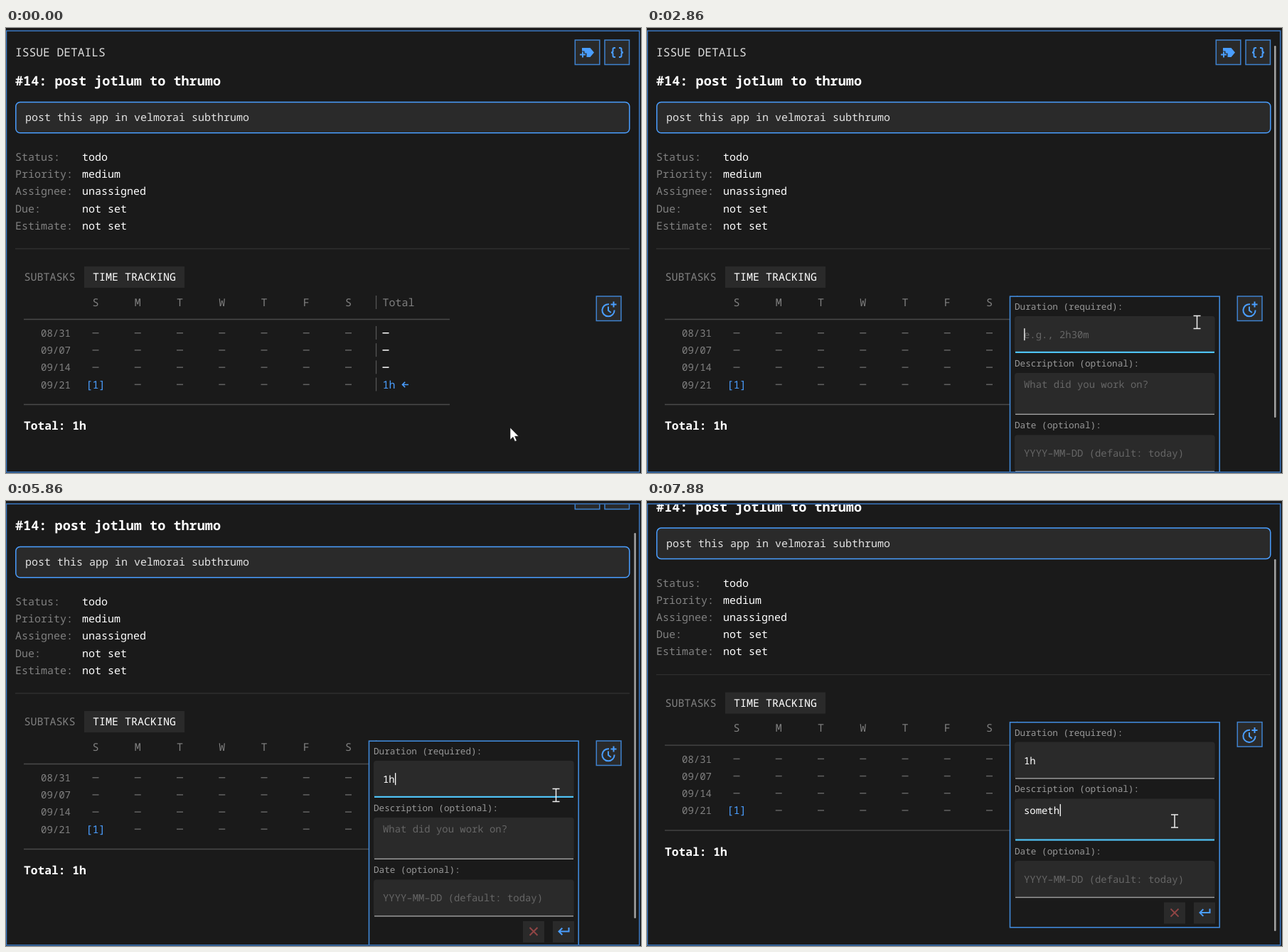
Animation, 893 px wide and 627 px high, one loop 8000 ms. Source, as an HTML page:

```html
<!DOCTYPE html>
<html lang="en">
<head>
<meta charset="utf-8">
<title>Issue details</title>
<style>
html, body { margin: 0; width: 100%; height: 100%; overflow: hidden; background: #1a1a1a; }
svg { display: block; }
text { font: 15px "Noto Sans Mono", "DejaVu Sans Mono", monospace; text-rendering: geometricPrecision; white-space: pre; fill: #fff; }
.heading { font-size: 16.25px; fill: #ddd; }
.title { font-size: 18.55px; font-weight: 700; }
.total { font-size: 16.25px; font-weight: 700; }
.body { fill: #e4e4e4; }
.value { font-weight: 500; }
.muted { fill: #808080; }
.date { font-size: 14px; fill: #808080; }
.mid { text-anchor: middle; }
.accent { fill: #4a9eff; }
.label { font-size: 12.7px; font-weight: 500; fill: #999; }
.field { font-size: 13.9px; font-weight: 500; }
.hint { font-size: 13.9px; fill: #666; }
.panel { fill: #2a2a2a; }
.button { fill: #2a2a2a; stroke: #3f82cf; stroke-width: 1.5; }
.icon { fill: none; stroke: #4a9eff; stroke-width: 2; }
.rule { fill: none; stroke: #4a4a4a; stroke-width: 1.4; }
.frame { fill: none; stroke: #3b78c2; stroke-width: 1.5; }
</style>
</head>
<body>
<svg width="893" height="627" viewBox="0 0 893 627">
  <clipPath id="view"><rect y="4.5" width="893" height="620.5"/></clipPath>
  <g clip-path="url(#view)">
    <g id="content">
      <text class="heading" x="13" y="40">ISSUE DETAILS</text>
      <rect class="button" x="800.3" y="17" width="34.5" height="34.5"/>
      <path class="accent" d="M810 28H821.5L827 34.5 821.5 41H816.5V35.5H813.5V32.5H810Z"/>
      <path class="icon" d="M807 37.5h8M811 33.5v8"/>
      <rect class="button" x="842" y="17" width="34.5" height="34.5"/>
      <path class="icon" d="M857 28h-1.5q-2 0-2 2v2.2q0 2.3-2.5 2.3q2.5 0 2.5 2.3v2.2q0 2 2 2h1.5M862 28h1.5q2 0 2 2v2.2q0 2.3 2.5 2.3q-2.5 0-2.5 2.3v2.2q0 2-2 2h-1.5"/>
      <text class="title" x="13" y="81">#14: post jotlum to thrumo</text>
      <rect class="panel" x="13.8" y="104.5" width="863" height="43.3" rx="6" stroke="#4a9eff" stroke-width="1.5"/>
      <text class="body" x="27" y="131">post this app in velmorai subthrumo</text>
      <g id="details"></g>
      <path class="rule" d="M13 311H877" style="stroke:#2e2e2e"/>
      <text class="muted" x="25.5" y="356">SUBTASKS</text>
      <rect class="panel" x="110" y="336" width="141" height="30"/>
      <text x="122" y="356">TIME TRACKING</text>
      <g id="table"></g>
      <path class="rule" d="M25 410.5H624M25 530.5H624"/>
      <text class="total" x="25" y="566">Total: 1h</text>
      <rect class="button" x="830.3" y="378" width="34.7" height="34.5"/>
      <path class="icon" d="M848 389.2A8.6 8.6 0 1 0 855.6 397.5M847 392.5v5.5l3.8 3M854.5 385.5v8M850.5 389.5h8"/>

      <g id="popup">
        <rect x="510.5" y="378.2" width="294.7" height="289" fill="#1a1a1a" stroke="#4088d8" stroke-width="1.6"/>
        <text class="label" x="517" y="397">Duration (required):</text>
        <rect class="panel" x="517" y="406" width="281.7" height="52" rx="4"/>
        <rect id="durationLine" x="518" width="280"/>
        <text id="duration" x="530" y="437"></text>
        <text class="label" x="517" y="476.7">Description (optional):</text>
        <rect class="panel" x="517" y="486" width="281.7" height="59" rx="4"/>
        <rect id="notesLine" x="518" width="280"/>
        <text id="notes" x="530" y="507"></text>
        <text class="label" x="517" y="564">Date (optional):</text>
        <rect class="panel" x="517" y="573.5" width="281.7" height="52" rx="4"/>
        <rect x="518" y="624.2" width="280" height="1.4" fill="#a0a0a0"/>
        <text class="hint" x="530" y="604">YYYY–MM–DD (default: today)</text>
        <path class="panel" d="M727 632h30v30h-30zM769 632h30v30h-30z"/>
        <path class="icon" d="M736.5 641l11 11m0-11l-11 11" style="stroke:#914545"/>
        <path class="icon" d="M791.5 641v5.5h-14m4.8-4.8l-4.8 4.8 4.8 4.8"/>
        <rect id="caret" width="1.3" height="17" fill="#fff"/>
      </g>
    </g>
    <rect id="thumb" width="2.6" rx="1.3" fill="#a0a0a0"/>
  </g>
  <path class="frame" d="M.5 4H890.7V625.7H.5Z"/>
  <g id="pointer">
    <path id="arrow" d="M0 0V17.2L4 13.4 6.7 19.6 9.3 18.4 6.6 12.3H12Z" fill="#fff" stroke="#111" stroke-width=".6"/>
    <path id="beam" d="M-5-9h10M0-9V9M-5 9h10" fill="none" stroke="#eee" stroke-width="1.5"/>
  </g>
  <circle id="click" r="14.2" fill="#fff000" opacity=".52"/>
</svg>
<script>
const LOOP = 8000, STEP = 170;
const el = Object.fromEntries([...document.querySelectorAll('svg [id]')].map(e => [e.id, e]));
const text = (cls, x, y, s) => `<text class="${cls}" x="${x}" y="${y}">${s}</text>`;
const dash = (x, y, color) => `<rect x="${x}" y="${y}" width="9" height="1.5" fill="${color}"/>`;
const bar = y => `<rect x="519.9" y="${y}" width="1.3" height="19" fill="#555"/>`;
const show = (node, on) => node.style.display = on ? '' : 'none';

const details = { Status: 'todo', Priority: 'medium', Assignee: 'unassigned', Due: 'not set', Estimate: 'not set' };
el.details.innerHTML = Object.entries(details).map(([name, value], i) => {
  const y = 187 + i * 24.2;
  return text('muted', 13, y, name + ':') + text('value', 107, y, value);
}).join('');

const dayX = i => 126 + i * 59.25;
let table = bar(377) + text('muted', 529.5, 391.5, 'Total');
[...'SMTWTFS'].forEach((day, i) => table += text('muted mid', dayX(i), 391.5, day));
['08/31', '09/07', '09/14', '09/21'].forEach((date, row) => {
  const y = 435 + row * 24.2, current = row === 3;
  table += text('date', 49, y, date) + bar(y - 15);
  for (let i = 0; i < 7; i++)
    table += current && i === 0 ? text('accent mid', 126, y, '[1]') : dash(dayX(i) - 4.5, y - 6, '#626262');
  table += current
    ? text('accent value', 529.5, y, '1h') + '<path class="icon" d="M566 502.5h-8.5m3.7-3.7l-3.7 3.7 3.7 3.7" style="stroke-width:1.6"/>'
    : dash(529.5, y - 6, '#fff');
});
el.table.innerHTML = table;

// Last entry whose time has come.
const at = (t, track) => track.findLast(entry => entry[0] <= t);

const moves = [
  { start: 500, steps: 6, from: [709, 563], to: [846, 397] },
  { start: 2690, steps: 2, from: [846, 397], to: [773.5, 414.5] },
  { start: 6200, steps: 2, from: [773.5, 414.5], to: [742, 451] },
];
function pointerAt(t) {
  const move = moves.findLast(m => t >= m.start) || moves[0];
  const done = Math.floor((t - move.start) / STEP) + 1;
  const p = Math.max(0, Math.min(1, done / move.steps));
  const eased = p * p * (3 - 2 * p);
  return move.from.map((v, i) => v + (move.to[i] - v) * eased);
}

// time, scroll offset, thumb top, thumb bottom, thumb opacity
const scrolling = [
  [0, 0, 25, 549, 0], [2190, 0, 25, 549, 1], [4690, 0, 25, 549, .5], [4860, 0, 25, 549, 0],
  [5860, 40, 45, 588, 1], [6030, 64.7, 66, 624, 1], [6200, 66.4, 82, 606, 1],
];
const durationText = [[0, ''], [5190, '1h']];
const notesText = [[0, ''], [7370, 's'], [7540, 'som'], [7710, 'some'], [7880, 'someth']];

function setField(node, value, hint) {
  node.textContent = value || hint;
  node.setAttribute('class', value ? 'field' : 'hint');
}
function setLine(node, bottom, focused) {
  const height = focused ? 2.2 : 1.4;
  node.setAttribute('y', bottom - height);
  node.setAttribute('height', height);
  node.setAttribute('fill', focused ? '#4fc3f7' : '#a0a0a0');
}

function draw(t) {
  const [, scroll, top, bottom, opacity] = at(t, scrolling);
  el.content.setAttribute('transform', `translate(0 ${-scroll})`);
  el.thumb.setAttribute('x', t >= 5860 && t < 6200 ? 883.3 : 882);
  el.thumb.setAttribute('y', top);
  el.thumb.setAttribute('height', bottom - top);
  el.thumb.setAttribute('opacity', opacity);

  show(el.popup, t >= 2190);
  const inNotes = t >= 6710;
  const duration = at(t, durationText)[1], notes = at(t, notesText)[1];
  setField(el.duration, duration, 'e.g., 2h30m');
  setField(el.notes, notes, 'What did you work on?');
  setLine(el.durationLine, 458, !inNotes);
  setLine(el.notesLine, 545, inNotes);

  const typed = inNotes ? notes : duration;
  el.caret.setAttribute('x', 530.2 + typed.length * 8.4);
  el.caret.setAttribute('y', inNotes ? 493.5 : 423.2);
  show(el.caret, !(t >= 3860 && t < 4360 || t >= 4860 && t < 5190));

  const [x, y] = pointerAt(t);
  const overField = t >= 2860;
  el.pointer.setAttribute('transform', `translate(${x} ${y})`);
  show(el.arrow, !overField);
  show(el.beam, overField);
  el.click.setAttribute('cx', x - (overField ? 2 : 1));
  el.click.setAttribute('cy', y - (overField ? 1 : 0));
  show(el.click, t >= 2020 && t < 2190 || t >= 6540 && t < 6710);
}

function tick() {
  draw(performance.now() % LOOP);
  requestAnimationFrame(tick);
}
tick();
</script>
</body>
</html>
```
